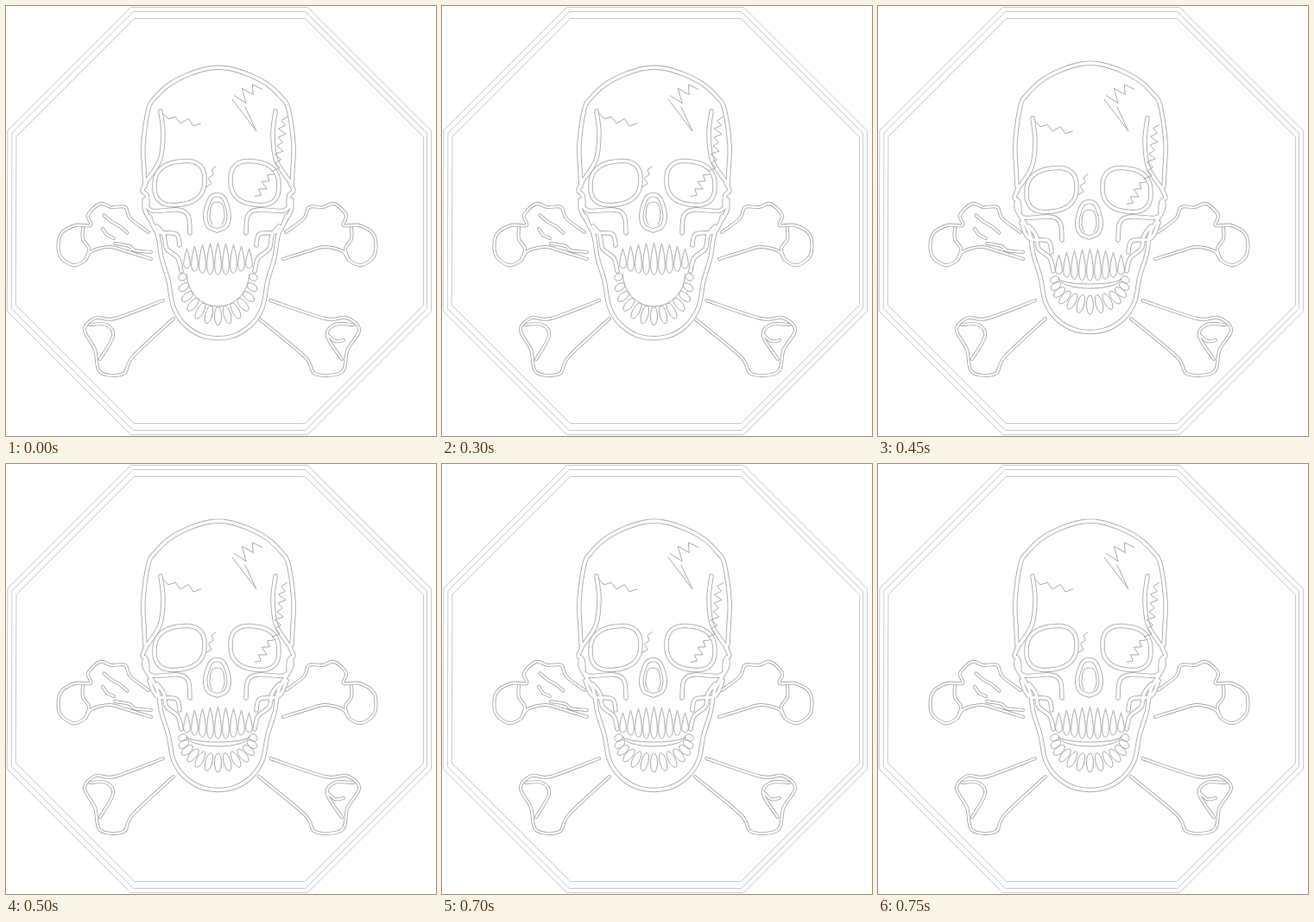
An HTML page with a canvas that plays this animation: 498x498 px, repeating every 0.8 s.

```html
<!DOCTYPE html>
<html lang="en">
<head>
<meta charset="utf-8">
<title>Laughing skull</title>
<style>
html, body { margin: 0; width: 100%; height: 100%; overflow: hidden; background: #fff; }
canvas { display: block; }
</style>
</head>
<body>
<canvas id="stage" width="498" height="498"></canvas>
<script>
const ctx = document.getElementById('stage').getContext('2d');
const LOOP = 800, CLOSE_AT = 450;
const AXIS = 245.5;
const INK = '#aaa', BORDER_INK = '#c4c4c4';

const parse = text => text.split(' ').map(p => p.split(',').map(Number));

// Smooth curve through all points (Catmull-Rom).
function curve(pts) {
  const path = new Path2D();
  const at = i => pts[Math.max(0, Math.min(pts.length - 1, i))];
  path.moveTo(...pts[0]);
  for (let i = 0; i < pts.length - 1; i++) {
    const [a, b, c, d] = [at(i - 1), at(i), at(i + 1), at(i + 2)];
    path.bezierCurveTo(b[0] + (c[0] - a[0]) / 6, b[1] + (c[1] - a[1]) / 6,
      c[0] - (d[0] - b[0]) / 6, c[1] - (d[1] - b[1]) / 6, ...c);
  }
  return path;
}

const stroke = text => curve(parse(text));

// The left half is given; the right half is its reflection.
function arch(text, axis = AXIS) {
  const half = parse(text);
  return curve([...half, ...half.map(([x, y]) => [2 * axis - x, y]).reverse()]);
}

function join(...paths) {
  const all = new Path2D();
  paths.forEach(p => all.addPath(p));
  return all;
}

function moved(path, dy, scaleY = 1) {
  const copy = new Path2D();
  copy.addPath(path, new DOMMatrix([1, 0, 0, scaleY, 0, dy]));
  return copy;
}

function withMirror(path, axis = AXIS, scale = 1) {
  const both = join(path);
  both.addPath(path, new DOMMatrix([-scale, 0, 0, 1, 2 * axis, 0]));
  return both;
}

function zigzag(x0, y0, x1, y1, steps, size) {
  const path = new Path2D(), length = Math.hypot(x1 - x0, y1 - y0);
  const nx = (y0 - y1) / length, ny = (x1 - x0) / length;
  for (let i = 0; i <= steps; i++) {
    const t = i / steps, off = (i % 2 ? 1 : -1) * size * (0.75 + 0.25 * Math.sin(i * 5));
    path.lineTo(x0 + (x1 - x0) * t + nx * off, y0 + (y1 - y0) * t + ny * off);
  }
  return path;
}

// Rounded box with a slight tilt.
function socket(cx, cy, rx, ry, tilt) {
  const path = new Path2D(), round = v => Math.sign(v) * Math.abs(v) ** 0.8;
  for (let a = 0; a < 2 * Math.PI; a += 0.1) {
    const x = rx * round(Math.cos(a));
    path.lineTo(cx + x, cy + ry * round(Math.sin(a)) + tilt * x);
  }
  path.closePath();
  return path;
}

function octagon(left, top, right, bottom, cut) {
  const path = new Path2D();
  for (const [x, y, dx, dy] of [[left, top, 1, 1], [right, top, -1, 1],
    [right, bottom, -1, -1], [left, bottom, 1, -1]]) {
    const ends = [[x, y + dy * cut], [x + dx * cut, y]];
    if (dx !== dy) ends.reverse();
    ends.forEach(p => path.lineTo(...p));
  }
  path.closePath();
  return path;
}

const border = join(octagon(1.5, 1.5, 492.5, 496.5, 143),
  octagon(6.5, 6.5, 487.5, 491.5, 141), octagon(11.5, 14.5, 483.5, 483.5, 137));

const upperBone = join(
  stroke('165,262 144,246 138,233 122,233 109,229 95,242 98,254 80,254 63,265 62,288 77,300 91,295 99,284 120,279 139,284 168,293'),
  stroke('89,257 89,270 96,281 92,294'));
const lowerBone = join(
  stroke('182,341 126,362 104,361 91,375 103,398 109,424 136,426 147,406 194,362'),
  stroke('97,369 116,369 124,382 109,409'));
const bones = join(
  withMirror(upperBone, 244.5), withMirror(lowerBone, 256, 1.13),
  stroke('372,380 381,388 391,387'),
  zigzag(113, 243, 141, 262, 3, 1), zigzag(111, 259, 124, 270, 2, 2),
  stroke('126,275 143,278 149,283 168,285'));

const cranium = arch('161,209 160,190 159,160 165,119 172,107 189,91 212,79 236,72', 246);

const face = join(
  socket(201, 205, 29, 25, -0.12), socket(288, 205, 28, 25, 0.12),
  withMirror(join(
    stroke('179,122 182,149 178,179 161,205'),
    stroke('162,205 158,214 163,219 164,230'),
    stroke('160,225 169,237 199,236 211,243 213,263'),
    stroke('166,243 175,261 197,264 201,277'))),
  arch('245,260 234,255 231,240 238,221', 244.5));

const cracks = join(
  zigzag(181, 127, 225, 138, 6, 4),
  zigzag(322, 128, 313, 192, 13, 5),
  zigzag(307, 193, 291, 222, 7, 5),
  zigzag(241, 185, 234, 210, 5, 3),
  arch('239,253 236,244 239,229', 244.5));

const topCrack = join(zigzag(293, 91, 268, 109, 5, 9),
  new Path2D('M262 108L290 145L277 117'));

const jaw = arch('161,224 161,237 175,263 180,291 188,318 194,349 208,370 231,383');
const jawInside = withMirror(stroke('175,255 183,266 186,281 199,292 203,307'));

function upperTeeth(shift) {
  const path = new Path2D();
  for (let i = -4; i <= 4; i++) {
    const x = AXIS + i * 9, top = 275 + i * i * 0.4 + shift, bottom = 311 - i * i * 0.45 + shift;
    path.moveTo(x, top);
    path.bezierCurveTo(x - 4, top + 12, x - 6, bottom, x, bottom);
    path.bezierCurveTo(x + 6, bottom, x + 4, top + 12, x, top);
  }
  return path;
}

function lowerTeeth(top, depth) {
  const path = new Path2D();
  for (let i = 0; i <= 12; i++) {
    const a = Math.PI * i / 12, tooth = new Path2D();
    tooth.ellipse(AXIS - 41 * Math.cos(a), top + depth * Math.sin(a),
      4, 5 + 6 * Math.sin(a), Math.cos(a), 0, 2 * Math.PI);
    path.addPath(tooth);
  }
  return path;
}

function lip(y, width, depth) {
  const path = new Path2D();
  path.ellipse(AXIS, y, width, depth, 0, 0, Math.PI);
  return path;
}

const openSkull = {
  bold: join(cranium, face, jaw, jawInside),
  fine: join(topCrack, cracks),
  teeth: join(upperTeeth(0), lowerTeeth(314, 45), lip(311, 36, 37))
};
const closedSkull = {
  bold: join(moved(cranium, -7.6, 1.036), moved(face, 8), moved(jaw, 10, 0.955), jawInside),
  fine: join(topCrack, moved(cracks, 9)),
  teeth: join(upperTeeth(7), lowerTeeth(317, 29), lip(316, 36, 6), lip(316, 36, 11))
};

function line(path, color, width) {
  ctx.strokeStyle = color;
  ctx.lineWidth = width;
  ctx.stroke(path);
}

// Two fine parallel lines: a grey band with a white core.
function outline(path, width) {
  line(path, INK, width);
  line(path, '#fff', width - 1.8);
}

function draw() {
  const skull = performance.now() % LOOP < CLOSE_AT ? openSkull : closedSkull;
  ctx.fillStyle = '#fff';
  ctx.fillRect(0, 0, 498, 498);
  ctx.lineJoin = ctx.lineCap = 'round';
  line(border, BORDER_INK, 0.9);
  outline(bones, 4);
  outline(skull.bold, 5.4);
  line(skull.fine, INK, 1);
  line(skull.teeth, INK, 1);
  requestAnimationFrame(draw);
}
draw();
</script>
</body>
</html>
```
